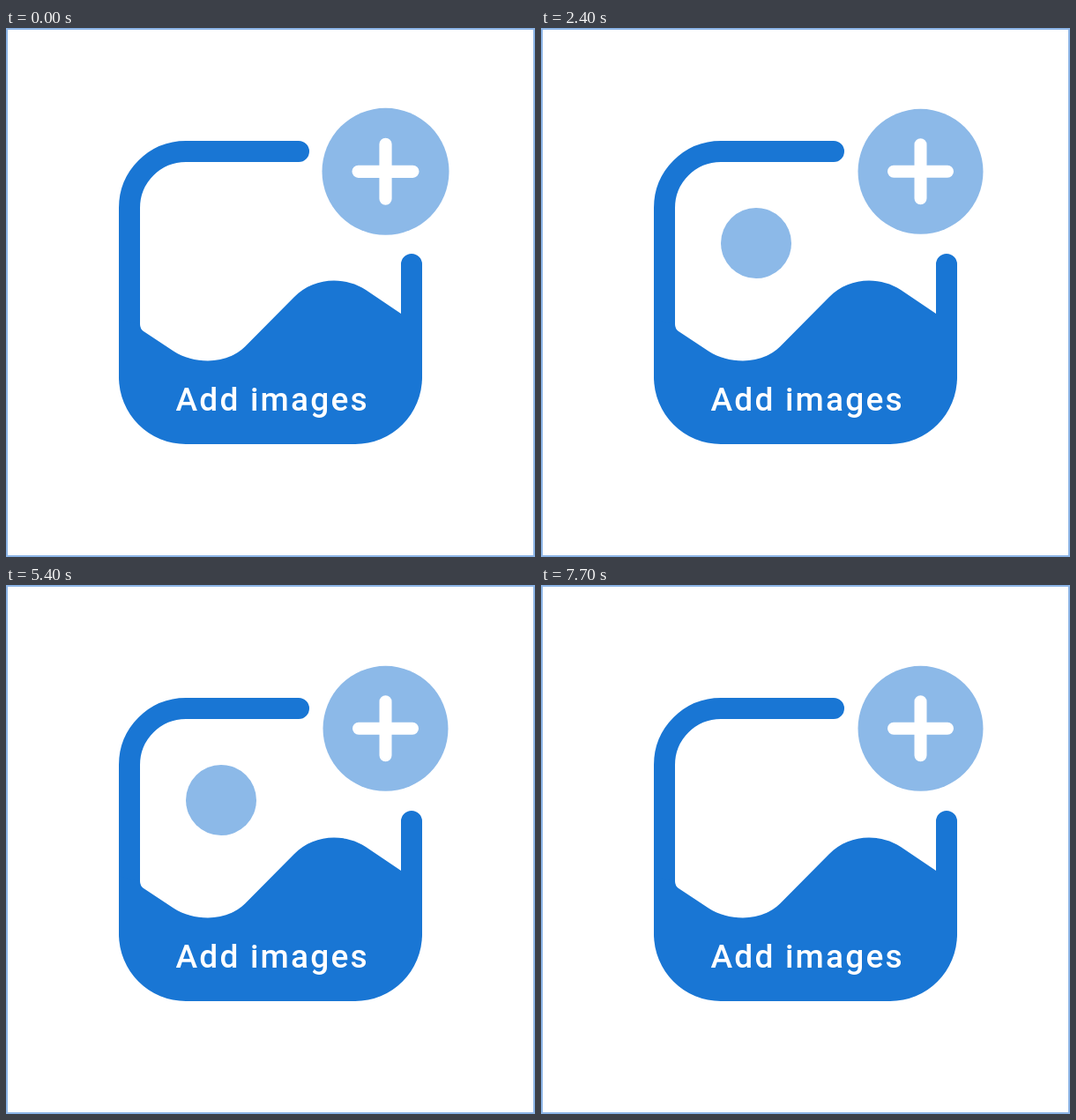
An HTML page for the animation above (7900 ms loop, 600 by 600 pixels).

```html
<!DOCTYPE html>
<html lang="en">
<head>
<meta charset="utf-8">
<title>Add images</title>
<style>
  html, body { margin: 0; width: 100%; height: 100%; overflow: hidden; background: #fff; }
  svg { display: block; width: 100%; height: 100%; }
  .light { fill: #8cb9e8; }
  .blue { fill: #1976d4; }
  .bar { fill: none; stroke: #1976d4; stroke-width: 24; stroke-linecap: round; }
  .plus { stroke: #fff; stroke-width: 14; stroke-linecap: round; }
  text { font: 500 37px Roboto, sans-serif; letter-spacing: 2.2px; fill: #fff; }
</style>
</head>
<body>
<svg viewBox="0 0 600 600">
  <rect width="600" height="600" fill="#fff"/>
  <rect x="1" y="1" width="598" height="598" fill="none" stroke="#8cb4e6" stroke-width="2"/>
  <circle id="sun" class="light" r="40"/>
  <path class="bar" d="M332 140H204A64 64 0 0 0 140 204V396M460 268V396"/>
  <path class="blue" d="M128 330L152 336Q152 341 156 344L190 366.5C202 374 215 377.5 229 377.5
    C244 377.5 259 373 271 361.5L327 305C339 293 355 286.5 372 286.5C385 286.5 397 290 408 297
    L448 324H472V396A76 76 0 0 1 396 472H204A76 76 0 0 1 128 396Z"/>
  <text x="192.5" y="434">Add images</text>
  <g id="badge">
    <circle class="light" r="71"/>
    <path class="plus" d="M-30.5 0H30.5M0 -30.5V30.5"/>
  </g>
</svg>
<script>
  const LOOP = 7900, STEP = 100, DEPTH = 108;
  const sun = document.getElementById('sun');
  const badge = document.getElementById('badge');

  const clamp = v => Math.min(1, Math.max(0, v));

  // Cubic Bezier easing, solved by bisection.
  function bezier(x1, y1, x2, y2) {
    const at = (a, b, s) => 3 * (1 - s) * (1 - s) * s * a + 3 * (1 - s) * s * s * b + s * s * s;
    return x => {
      if (x <= 0 || x >= 1) return clamp(x);
      let lo = 0, hi = 1;
      for (let i = 0; i < 30; i++) {
        const mid = (lo + hi) / 2;
        if (at(x1, x2, mid) < x) lo = mid; else hi = mid;
      }
      return at(y1, y2, lo);
    };
  }

  const rise = bezier(0.25, 0.1, 0.25, 1);
  const set = bezier(0.33, 0.3, 0.6, 1);

  // Distance of the sun below its resting height.
  function sunDrop(t) {
    return t < 3000
      ? DEPTH * (1 - rise((t - 40) / 1340))
      : DEPTH * set((t - 6430) / 1400);
  }

  // One bump per second, the last one at 7 s.
  function pulse(t) {
    if (t >= 7500) return 1;
    const x = ((t + 40) % 1000) / 420;
    return x < 1 ? 1 + 0.166 * Math.sin(Math.PI * x) ** 2 : 1;
  }

  function draw(t) {
    const drop = sunDrop(t);
    sun.setAttribute('cx', 244 + 0.9 * drop);
    sun.setAttribute('cy', 244 + drop);
    badge.setAttribute('transform', `translate(430.5 162.8) scale(${pulse(t)})`);
  }

  let start;
  function tick(now) {
    if (start === undefined) start = now;
    const t = Math.max(0, now - start) % LOOP;
    draw(Math.floor(t / STEP) * STEP);
    requestAnimationFrame(tick);
  }
  draw(0);
  requestAnimationFrame(tick);
</script>
</body>
</html>
```
